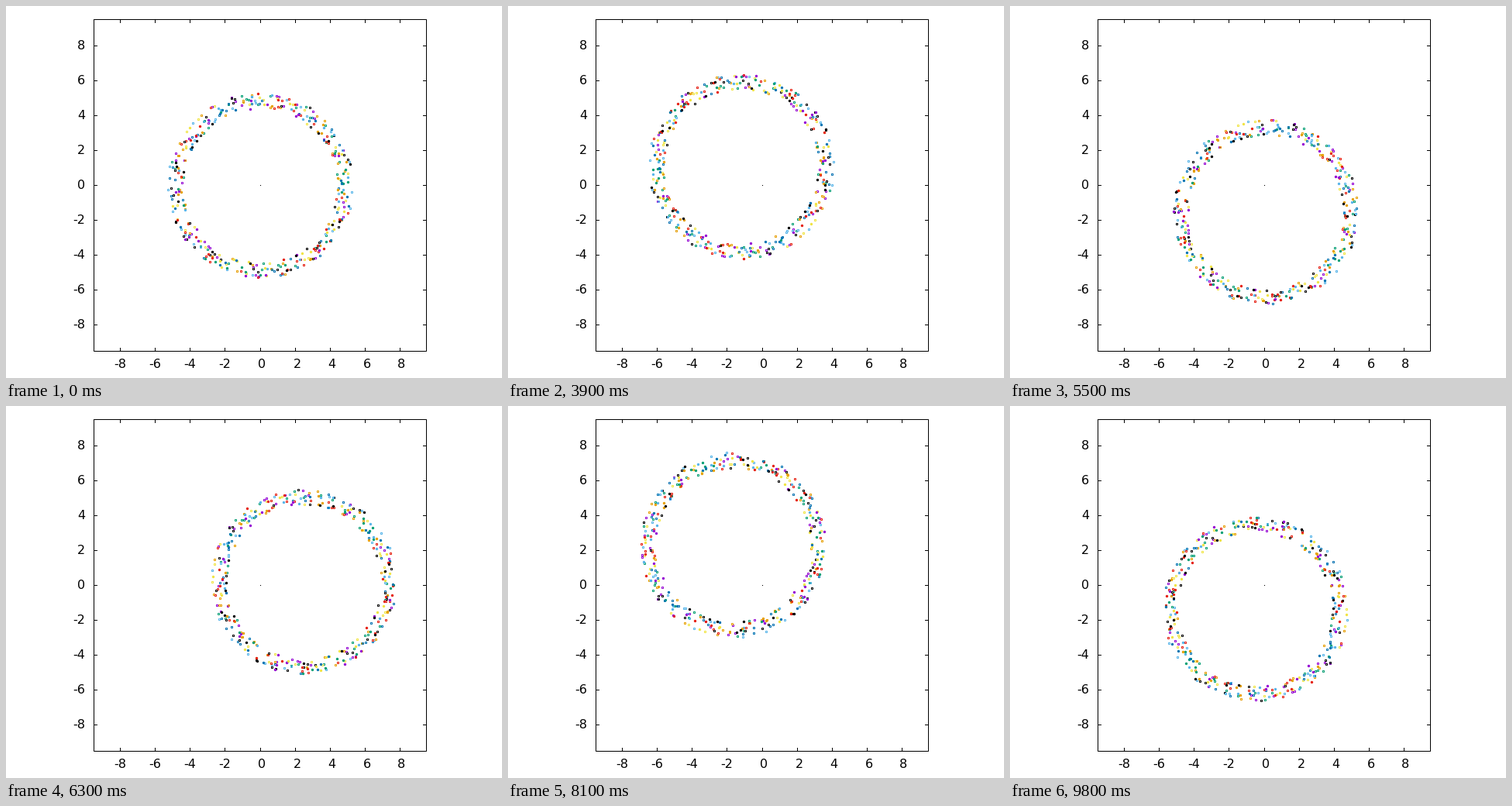
Write a matplotlib script that moves like this. It is 640 px wide and 480 px high and loops after 9.9 s.

```python
import matplotlib.pyplot as plt
import numpy as np
from matplotlib.animation import FuncAnimation

W, H, DPI = 640, 480, 100
PX = 72 / DPI                       # one pixel in points
LEFT, RIGHT, TOP, BOTTOM = 113.5, 542.5, 17.5, 445.5
X0, Y0 = (LEFT + RIGHT) / 2, (TOP + BOTTOM) / 2
SX, SY = (RIGHT - LEFT) / 19, (BOTTOM - TOP) / 19

FRAMES, HOLD = 99, 24               # the ring rests before it is kicked
TURN = np.radians(36)               # clockwise phase advance per step
COUNT = 400
COLORS = ["#9400d3", "#009e73", "#56b4e9", "#e69f00",
          "#f0e442", "#0072b2", "#e51e10", "#000000"]

# Drift of the ring in the co-rotating frame
STEPS = [0, 1, 15, 24, 34, 39, 44, 57, 62, 74]
AMPLITUDE = [0, .47, 1.63, 2.25, 1.2, 2.49, 1.35, 2.86, 1.45, 1.45]
PHASE = [290, 290, 318, 292, 317, 329, 342, 378, 384, 393]

# Jittered even spacing around the ring, colours in random order
rng = np.random.default_rng(12)
angle = 2 * np.pi * rng.permutation(COUNT) / COUNT + rng.normal(0, .06, COUNT)
ring = rng.uniform(4.42, 5.3, COUNT) * np.exp(1j * angle)

fig = plt.figure(figsize=(W / DPI, H / DPI), dpi=DPI, facecolor="white")
ax = fig.add_axes([0, 0, 1, 1])
ax.set_xlim(0, W)
ax.set_ylim(H, 0)
ax.axis("off")


def line(xs, ys):
    ax.plot(xs, ys, color="black", lw=PX, snap=False,
            solid_capstyle="projecting", solid_joinstyle="miter")


def label(x, y, value, ha):
    ax.text(x, y, str(value), ha=ha, va="baseline",
            family="DejaVu Sans", size=16 * PX)


def draw_frame():
    line([LEFT, RIGHT, RIGHT, LEFT, LEFT], [TOP, TOP, BOTTOM, BOTTOM, TOP])
    for v in range(-8, 9, 2):
        x = np.floor(X0 + v * SX) + .5
        y = np.floor(Y0 - v * SY) + .5
        for edge, d in ((TOP, 4), (BOTTOM, -4)):
            line([x, x], [edge, edge + d])
        for edge, d in ((LEFT, 4), (RIGHT, -4)):
            line([edge, edge + d], [y, y])
        label(x + (2 if v >= 0 else 0), 467, v, "center")
        label(102, y + 4.5, v, "right")
    line([X0 + .45, X0 + .55], [Y0, Y0])


def make_dots():
    groups = []
    index = np.arange(COUNT)
    for filled in (False, True):
        for c, color in enumerate(COLORS):
            pick = (index % 8 == c) & ((index // 8 % 3 == 0) == filled)
            if filled:
                style = dict(marker="o", ms=3.4 * PX, mew=0, mfc=color)
            else:
                style = dict(marker="s", ms=2 * PX, mew=PX, mfc="none")
            dots, = ax.plot([], [], ls="none", mec=color, **style)
            groups.append((dots, pick))
    return groups


def offset(step):
    phase = np.radians(np.interp(step, STEPS, PHASE))
    return np.interp(step, STEPS, AMPLITUDE) * np.exp(1j * phase)


def update(i):
    step = max(0, i - HOLD)
    z = (ring + offset(step)) * np.exp(-1j * TURN * step)
    x, y = X0 + SX * z.real, Y0 - SY * z.imag
    for dots, pick in groups:
        dots.set_data(x[pick], y[pick])
    return [dots for dots, _ in groups]


draw_frame()
groups = make_dots()
anim = FuncAnimation(fig, update, frames=FRAMES, interval=100,
                     repeat=True, repeat_delay=0, blit=False)
plt.show()
```
